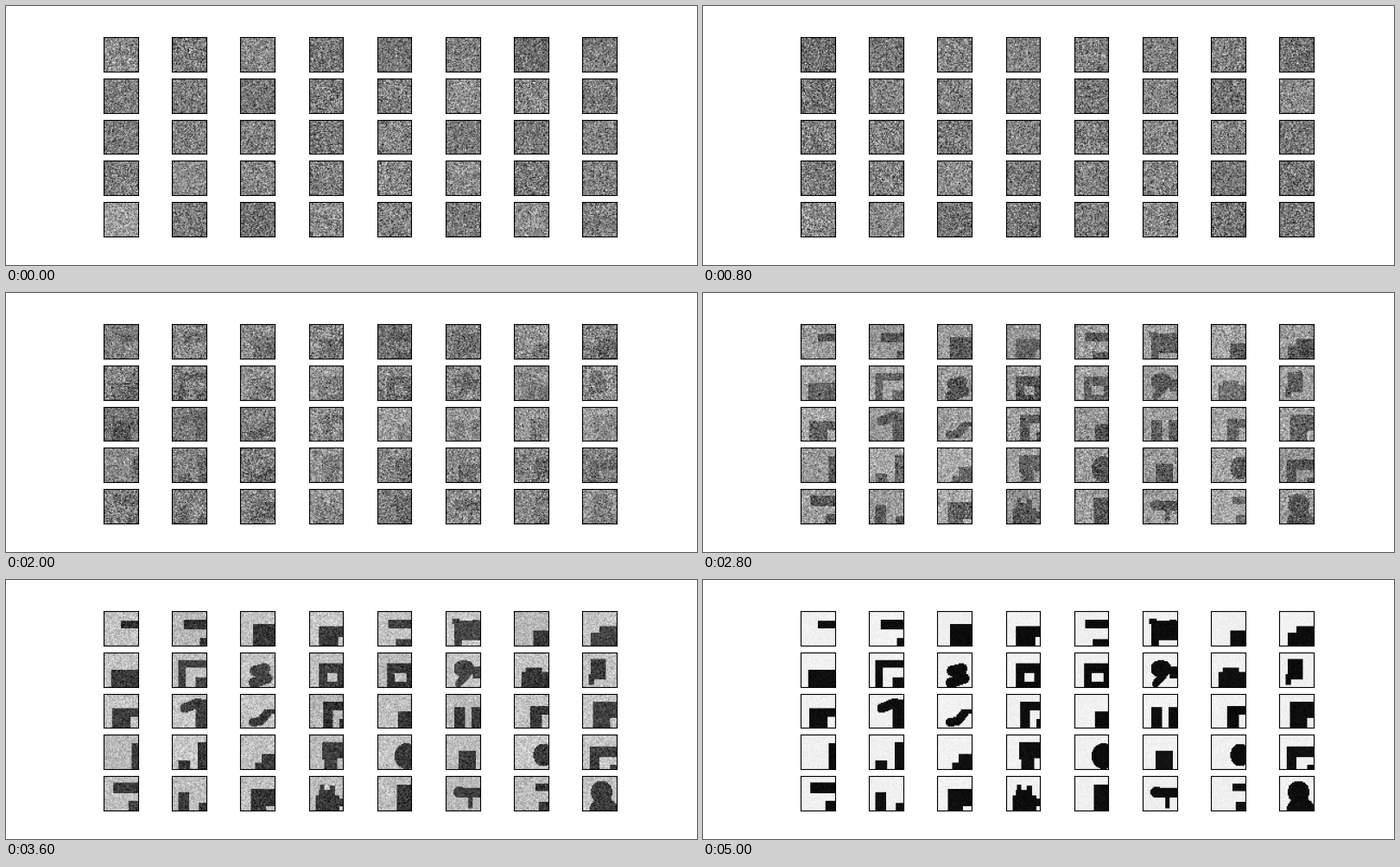
Write a matplotlib script that moves like this. It is 800 px wide and 300 px high and loops after 5.4 s.

```python
import numpy as np
import matplotlib.pyplot as plt
from matplotlib.animation import FuncAnimation

ROWS, COLS, N = 5, 8, 32
STEPS, FRAMES, INTERVAL = 26, 27, 200

yy, xx = np.mgrid[0:N, 0:N] + 0.5


# Shapes are boolean masks on the N x N grid, joined with "|".
def box(x0, y0, x1=N, y1=N):
    return (xx > x0) & (xx < x1) & (yy > y0) & (yy < y1)


def oval(cx, cy, rx, ry):
    return ((xx - cx) / rx) ** 2 + ((yy - cy) / ry) ** 2 < 1


def limb(r, *pts):
    """Round stroke of radius r through the points."""
    mask = np.zeros((N, N), bool)
    for (ax, ay), (bx, by) in zip(pts, pts[1:]):
        dx, dy = bx - ax, by - ay
        t = ((xx - ax) * dx + (yy - ay) * dy) / (dx * dx + dy * dy)
        t = t.clip(0, 1)
        mask |= np.hypot(xx - ax - t * dx, yy - ay - t * dy) < r
    return mask


def nest(*corners):
    """Boxes reaching the lower right corner, each inverting the last."""
    mask = np.zeros((N, N), bool)
    for x, y in corners:
        mask ^= box(x, y)
    return mask


bars = [
    box(16, 9, 32, 16),
    box(11, 8, 32, 17) | box(26, 25),
    nest((12, 12)),
    nest((9, 14), (27, 24)),
    box(10, 8, 32, 16) | box(17, 26),
    box(8, 9, 32, 27) | box(8, 25, 15) | box(6, 7, 13, 12) | box(25, 8, 31),
    nest((18, 18)),
    box(16, 14) | box(8, 20),
]
bars[5] &= ~box(15, 27)

frames = [
    nest((7, 16)),
    nest((6, 7), (13, 14), (22, 23)),
    limb(5, (14, 17), (23, 15)) | limb(5, (13, 28), (25, 24)),
    nest((9, 10)) & ~box(17, 19, 26, 27),
    nest((9, 10)) & ~box(16, 19, 27, 27),
    oval(17, 15, 9.5, 8) | box(25, 13, 32, 24) | limb(3.5, (12, 29), (20, 20)),
    box(7, 18) | box(11, 14, 26),
    box(8, 6, 22, 25) | box(6, 20, 11, 30),
]

arches = [
    nest((8, 14), (25, 22)),
    limb(4.5, (12, 14), (24, 9)) | box(22, 6),
    limb(4, (12, 27), (19, 26), (25, 19)) | limb(2.5, (24, 17), (32, 17)),
    nest((13, 8), (22, 16), (28, 24)),
    nest((19, 17)),
    box(8, 13, 18) | box(24, 13),
    nest((15, 12), (26, 20)),
    nest((10, 8), (26, 23)),
]

edges = [
    nest((26, 8)),
    box(6, 24, 17) | box(24, 7),
    box(20, 18) | box(14, 26),
    nest((12, 7), (26, 22)) & ~box(12, 23, 14),
    oval(27, 20, 11, 12),
    box(12, 15, 28),
    oval(27, 19, 9, 10.5),
    nest((7, 11), (16, 21), (26, 28)),
]

blocks = [
    box(9, 6, 32, 16) | box(23, 23),
    box(6, 15, 16) | box(25, 25),
    nest((10, 12), (24, 28)),
    box(10, 8, 14) | box(19, 9, 24) | box(9, 13, 24) | box(6, 18, 28)
    | box(26, 21, 32, 28),
    nest((18, 8)),
    oval(13, 15, 6, 5) | box(13, 11, 32, 20) | limb(2.5, (23, 20), (23, 28)),
    box(20, 7, 32, 14) | box(23, 24),
    oval(18, 15, 10, 10.5) | oval(20, 31, 13, 11),
]

clean = 1.0 - np.array(bars + frames + arches + edges + blocks)

# Noise falls geometrically relative to the dark/light step,
# and carries over more and more from one step to the next.
sigma = np.geomspace(24, 0.021, STEPS)
rng = np.random.default_rng(7)
noise = rng.standard_normal((STEPS,) + clean.shape)
for k in range(1, STEPS):
    keep = k / (STEPS - 1)
    noise[k] = keep * noise[k - 1] + np.sqrt(1 - keep ** 2) * noise[k]

fig, axes = plt.subplots(ROWS, COLS, figsize=(8, 3), dpi=100)
images = []
for ax, img in zip(axes.flat, clean):
    ax.set_xticks([])
    ax.set_yticks([])
    images.append(ax.imshow(img, cmap="gray"))


def update(i):
    k = min(i, STEPS - 1)  # the last state is held twice as long
    for im, base, eps in zip(images, clean, noise[k]):
        x = base + sigma[k] * eps
        im.set_data(x)
        im.set_clim(x.min(), x.max())
    return images


anim = FuncAnimation(fig, update, frames=FRAMES, interval=INTERVAL,
                     init_func=lambda: update(0), repeat=True, repeat_delay=0)
plt.show()
```
